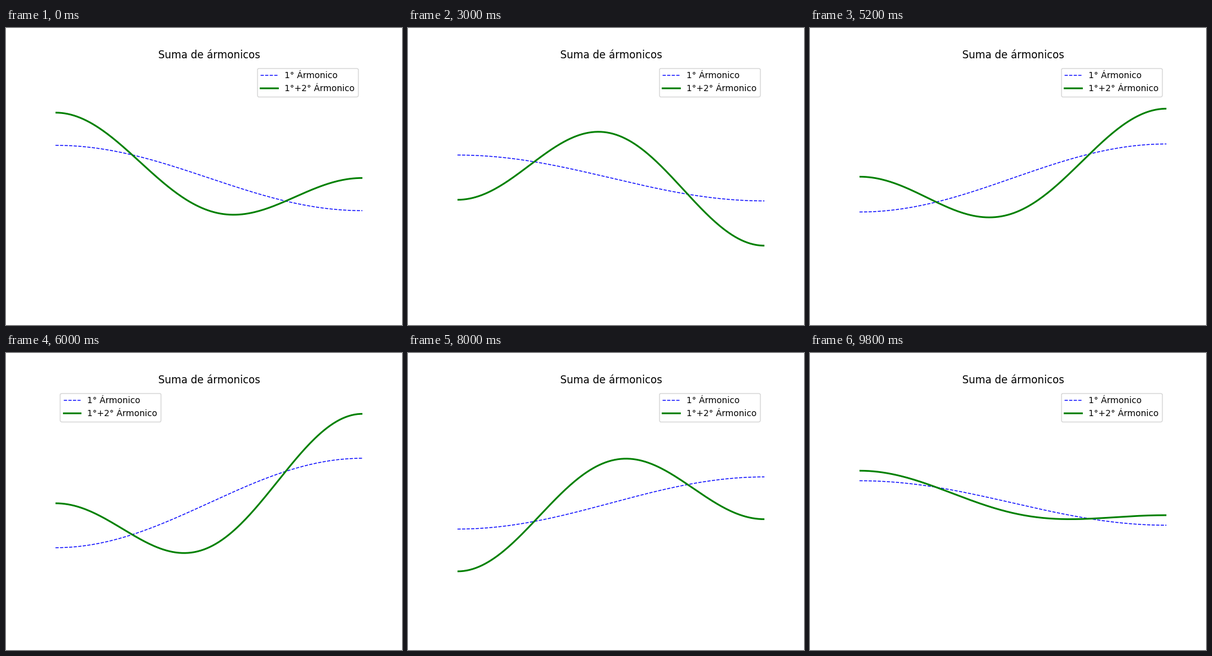
Animation, 640 px wide and 480 px high, one loop 10000 ms. Source, as a matplotlib script:

```python
import numpy as np
import matplotlib.pyplot as plt
from matplotlib.animation import FuncAnimation

FRAMES = 50
INTERVAL = 200

x = np.linspace(0, 1, 200)
times = np.linspace(0, 6, FRAMES)

fig, ax = plt.subplots(figsize=(6.4, 4.8), dpi=100)
ax.set_xlim(0, 1)
ax.set_ylim(-3.5, 3.5)
ax.axis("off")
ax.set_title("Suma de ármonicos")

first, = ax.plot([], [], "b--", lw=1, label="1° Ármonico")
total, = ax.plot([], [], "g-", lw=2, label="1°+2° Ármonico")
# "best" moves the legend aside whenever a curve runs into it
ax.legend(loc="best")


def harmonic(n, t):
    return (np.cos(n * t) + np.sin(n * t)) * np.cos(n * np.pi * x)


def update(i):
    t = times[i]
    y1 = harmonic(1, t)
    first.set_data(x, y1)
    total.set_data(x, y1 + harmonic(2, t))
    return first, total


def init():
    return update(0)


anim = FuncAnimation(fig, update, frames=FRAMES, init_func=init,
                     interval=INTERVAL, repeat=True, repeat_delay=0)
plt.show()
```
